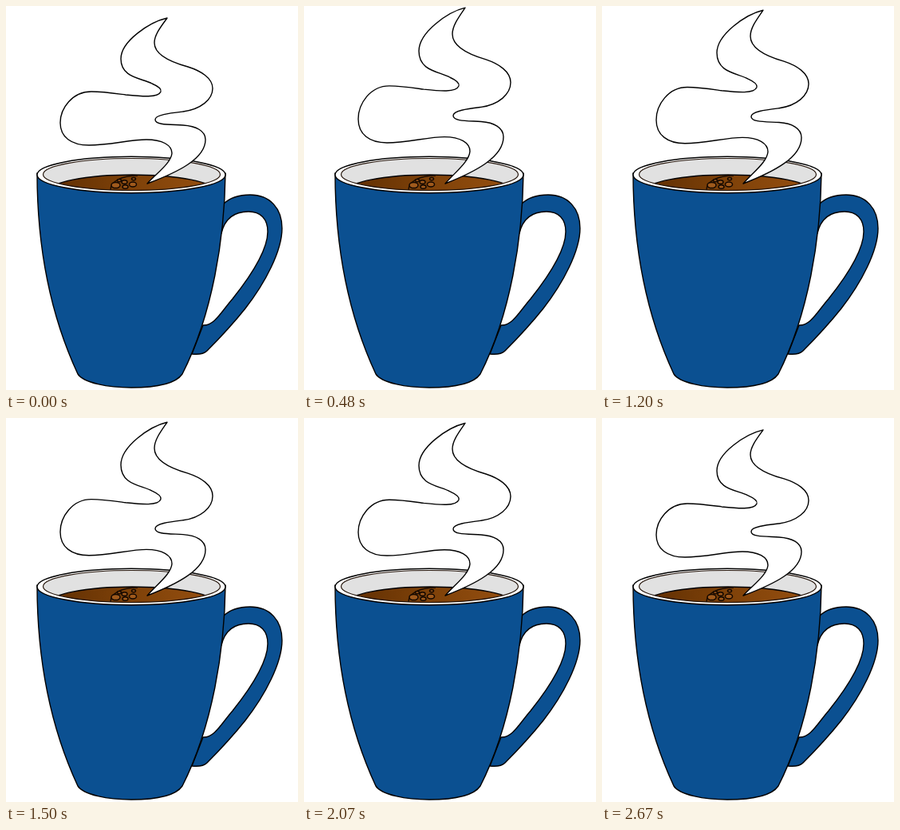
An HTML page that plays this animation: 366 by 480 pixels, repeating every 2700 ms.

```html
<!DOCTYPE html>
<html lang="en">
<head>
<meta charset="utf-8">
<title>Hot coffee</title>
<style>
  html, body { margin: 0; width: 100%; height: 100%; overflow: hidden; background: #fff; }
  svg { display: block; width: 100%; height: 100%; }
</style>
</head>
<body>
<svg viewBox="0 0 366 480" stroke="#000" stroke-width="1.4" stroke-linejoin="round">
  <defs>
    <linearGradient id="coffee">
      <stop offset="0" stop-color="#5f2e03"/>
      <stop offset=".45" stop-color="#7c4008"/>
      <stop offset="1" stop-color="#964f10"/>
    </linearGradient>
    <clipPath id="inside"><ellipse cx="157.5" cy="210.5" rx="111" ry="20"/></clipPath>
  </defs>

  <g fill="#0b5091">
    <path d="M272 248C280 240 292 236 306 236C331 236 346 253 346 278C346 306 325 346 300 378C280 403 262 421 252 431C248 435 242 436 233 435L247 399C261 400 270 382 284 366C308 336 328 305 328 282C328 266 319 257 304 257C285 257 274 267 270 284Z"/>
    <path d="M39 209C39 300 55 385 90 460C97 471 128 477 157 477C185 477 212 473 221 460C259 385 274 290 275 209Z"/>
  </g>

  <ellipse cx="157" cy="211" rx="118" ry="22.7" fill="#fff"/>
  <ellipse cx="157.5" cy="210.5" rx="111" ry="20" fill="#e1e1e1" stroke="none"/>
  <g clip-path="url(#inside)">
    <ellipse cx="158" cy="232" rx="105" ry="21" fill="url(#coffee)"/>
    <path d="M131 230C131 219 145 212 165 212" fill="none" stroke="#1c0c00"/>
    <g id="bubbles" fill="#a05a1c" stroke="#140800" stroke-width="1.5"></g>
  </g>
  <ellipse cx="157.5" cy="210.5" rx="111" ry="20" fill="none" stroke="#24140a" stroke-width="1.2"/>

  <path id="steam" fill="#fff" vector-effect="non-scaling-stroke" d="M202 15C180 20 144 44 144 66C144 90 170 90 183 97C190 100 195 104 194 107C191 115 170 113 150 111C135 109 122 107 107 107C83 107 68 128 68 146C68 164 82 174 104 174C130 174 155 167 176 167C196 167 208 174 208 184C207 196 190 208 177 222C215 208 250 191 250 167C250 156 238 150 222 149C206 148 187 149 187 142C187 136 205 134 222 132C244 129 259 117 259 103C259 90 244 81 228 76C206 70 186 61 186 46C186 36 194 26 202 15Z"/>
</svg>
<script>
  const PERIOD = 900, BASE = 222, STRETCH = 13 / 207;
  const steam = document.getElementById('steam');

  // x, y, horizontal radius
  const bubbles = [[137.5, 224, 5.5], [149.5, 226, 3.5], [159, 223, 4.5], [148.5, 220, 3.5], [160, 216, 2.5], [142, 218, 2.5]];
  document.getElementById('bubbles').innerHTML = bubbles
    .map(([x, y, r]) => `<ellipse cx="${x}" cy="${y}" rx="${r}" ry="${r * 0.65}"/>`).join('');

  function draw() {
    const phase = performance.now() % PERIOD / PERIOD;
    const scale = 1 + STRETCH * (1 - Math.cos(phase * 2 * Math.PI)) / 2;
    steam.setAttribute('transform', `translate(0 ${BASE * (1 - scale)}) scale(1 ${scale})`);
    requestAnimationFrame(draw);
  }
  draw();
</script>
</body>
</html>
```
